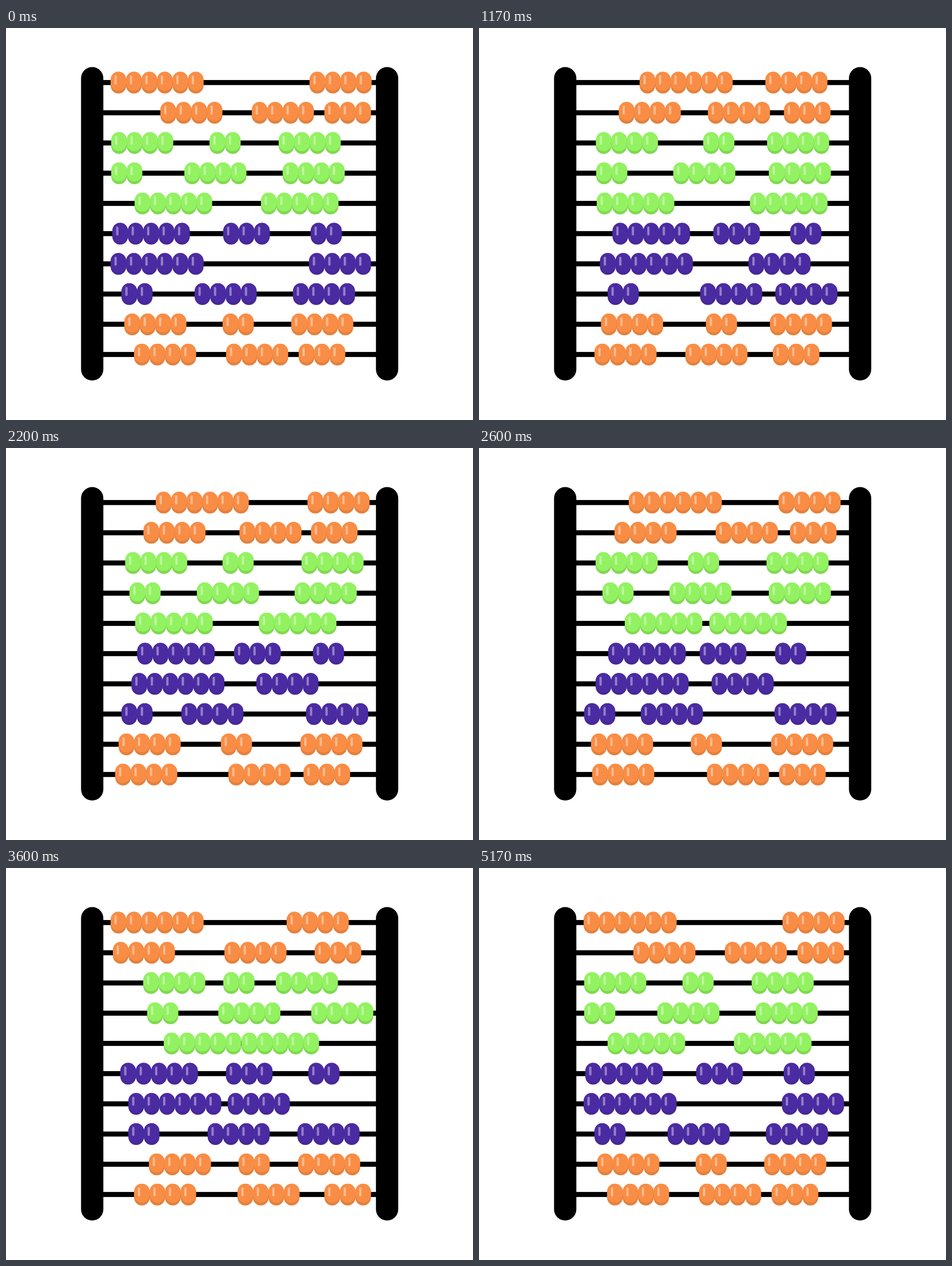
Write an HTML page with a canvas that moves like this. It is 817 px wide and 685 px high and loops after 5.21 s.

```html
<!DOCTYPE html>
<html lang="en">
<head>
<meta charset="utf-8">
<title>Abacus</title>
<style>
html, body { margin: 0; width: 100%; height: 100%; overflow: hidden; background: #fff; }
canvas { display: block; }
</style>
</head>
<body>
<canvas id="stage" width="817" height="685"></canvas>
<script>
const ctx = document.getElementById('stage').getContext('2d');
const LOOP = 5210, LAST = 129, PITCH = 27.05, HALF = 13.7;
const BEATS = [0, 13, 45, 65, 90, 108, LAST];
const ORANGE = ['#f98d45', '#e4813d'];
const GREEN = ['#93f261', '#80d950'];
const PURPLE = ['#4b2ba2', '#462897'];
const bead = new Path2D('M0-19C8-19 13.7-12.8 13.7-4.5V4.5C13.7 12.8 8 19 0 19S-13.7 12.8-13.7 4.5V-4.5C-13.7-12.8-8-19 0-19Z');
const shine = new Path2D();
shine.roundRect(-7, -12.5, 4, 15.5, 1.6);
const rows = [];

// Eases from home through the offset of each beat, then back home
function slide(home, ...offsets) {
  const at = i => home + (offsets[i - 1] || 0);
  return step => {
    const i = Math.max(1, BEATS.findIndex(beat => beat >= step));
    const u = (step - BEATS[i - 1]) / (BEATS[i] - BEATS[i - 1]);
    return at(i - 1) + (at(i) - at(i - 1)) * u * u * (3 - 2 * u);
  };
}

// Stays in proportion between its neighbours, with a sway of its own
function between(left, right, home, sway) {
  const share = (home - left(0)) / (right(0) - left(0));
  return step => left(step) + (right(step) - left(step)) * share
    + sway * Math.sin(3 * Math.PI * step / LAST);
}

// counts: beads per run, left to right; middle: home and sway of a third run
function row(colors, counts, left, right, middle) {
  const paths = middle ? [left, between(left, right, ...middle), right] : [left, right];
  rows.push({ colors, counts, paths });
}

row(ORANGE, [6, 4], slide(183, 117, 79, 79), slide(531, -60, 0, -7, -40));
row(ORANGE, [4, 4, 3], slide(270, -25, -26, -33, -83), slide(557, -13, -34, -13, -17, -24), [430, -6]);
row(GREEN, [4, 2, 4], slide(184, 12, 29, 20, 56, 64), slide(477, 0, 54, 26, -5, -3), [356, 14]);
row(GREEN, [2, 4, 4], slide(184, 10, 32, 32, 63, 9), slide(484, 27, 19, 23, 50, 4), [312, 7]);
row(GREEN, [5, 5], slide(225, -10, -28, 30, 51, 45), slide(446, 20, 36, -43, -34, -20));
row(PURPLE, [5, 3, 2], slide(186, 48, 47, 40, 14), slide(533, 0, 23, -15, -4, -3), [380, 3]);
row(PURPLE, [6, 4], slide(183, 5, 52, 21, 31, 14), slide(530, -56, -61, -123, -142, -44));
row(PURPLE, [2, 4, 4], slide(202, 28, 18, -18, 12, 9), slide(502, 2, 31, 15, 8), [330, 43]);
row(ORANGE, [4, 2, 4], slide(207, 22, -9, -11, 43, 72), slide(499, 0, 20, 12, 12, 16), [379, 11]);
row(ORANGE, [4, 4, 3], slide(224, -4, -40, -26, 0, 10), slide(512, 0, 4, 13, 45, 18), [385, -18]);

function drawBead(x, y, [light, dark]) {
  ctx.save();
  ctx.translate(x, y);
  ctx.fillStyle = dark;
  ctx.fill(bead);
  ctx.clip(bead);
  ctx.translate(0, -5);
  ctx.fillStyle = light;
  ctx.fill(bead);
  ctx.translate(0, 5);
  ctx.fillStyle = 'rgba(255,255,255,.4)';
  ctx.fill(shine);
  ctx.restore();
}

function draw(step) {
  ctx.fillStyle = '#fff';
  ctx.fillRect(0, 0, 817, 685);
  ctx.fillStyle = '#000';
  for (const x of [131.3, 647.2]) {
    ctx.beginPath();
    ctx.roundRect(x, 68.3, 39, 547.7, 19.5);
    ctx.fill();
  }
  rows.forEach(({ colors, counts, paths }, r) => {
    const y = 95.5 + r * 52.8;
    ctx.fillStyle = '#000';
    ctx.fillRect(160, y - 4.6, 500, 8.8);
    paths.forEach((path, p) => {
      const x = path(step) + HALF;
      for (let i = 0; i < counts[p]; i++) drawBead(x + i * PITCH, y, colors);
    });
  });
}

// 25 poses per second, shown at 30 pictures per second
function tick() {
  const picture = Math.floor((performance.now() % LOOP + 4) * 0.03);
  draw(Math.min(LAST, Math.floor(picture * 5 / 6)));
  requestAnimationFrame(tick);
}
tick();
</script>
</body>
</html>
```
